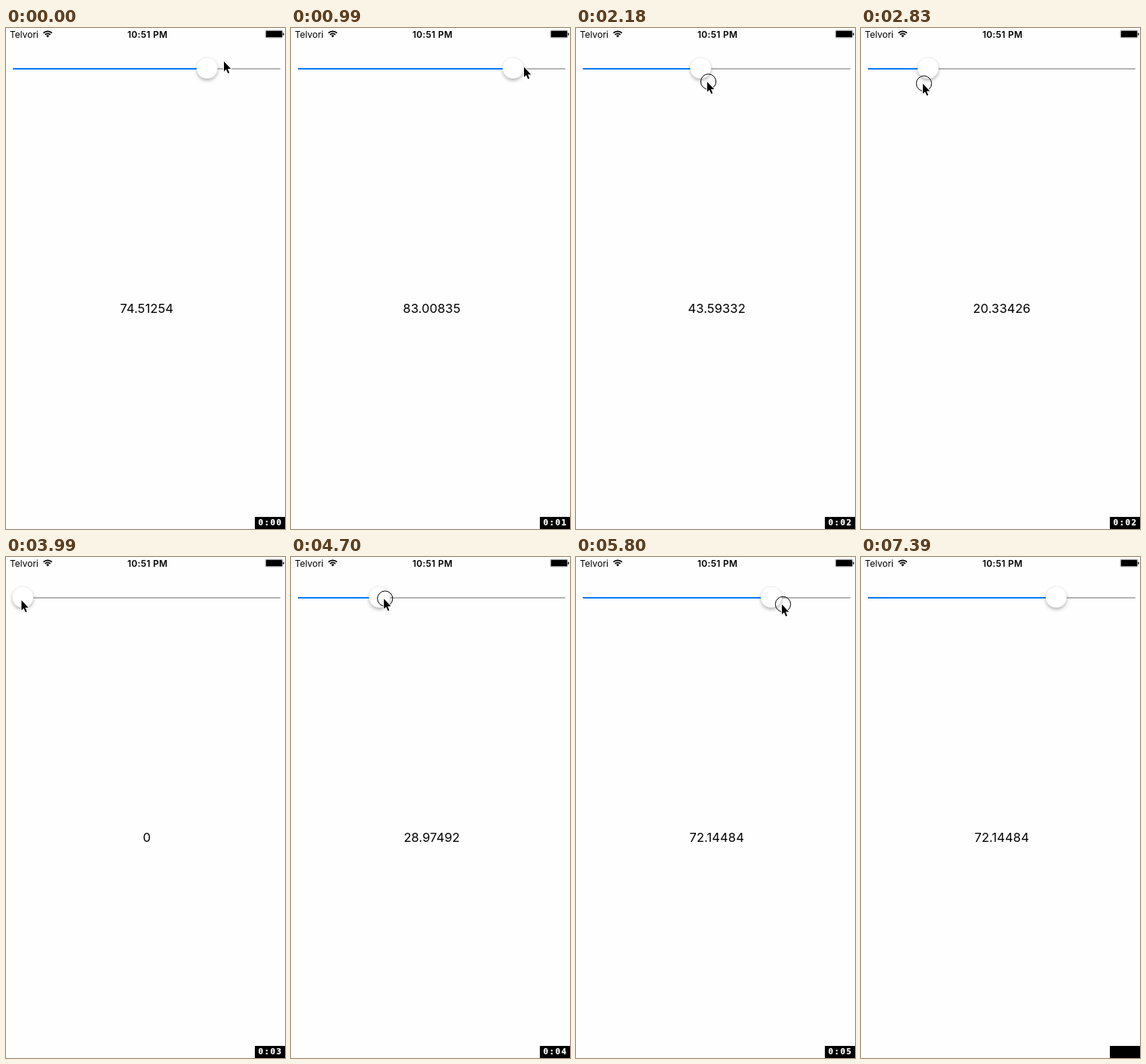
An HTML page that plays this animation: 370x663 px, repeating every 8130 ms.

```html
<!DOCTYPE html>
<html lang="en">
<head>
<meta charset="utf-8">
<title>Slider</title>
<style>
  html, body { margin: 0; width: 100%; height: 100%; overflow: hidden; background: #fefefe; }
  svg { display: block; width: 100%; height: 100%; }
  text { font-family: Inter, Roboto, sans-serif; white-space: pre; }
  #clock { font: bold 11px "DejaVu Sans Mono", monospace; letter-spacing: 1.38px; fill: #fff; stroke: #fff; stroke-width: .25px; }
</style>
</head>
<body>
<svg viewBox="0 0 370 663">
  <defs>
    <filter id="shadow" x="-50%" y="-50%" width="200%" height="200%">
      <feDropShadow dx="0" dy="2.6" stdDeviation="1.9" flood-opacity=".28"/>
    </filter>
    <path id="arrow" d="M0 .7V14L3 11.3 5.3 16.6 7.2 15.8 5 10.6H9.3Z"/>
  </defs>
  <rect width="370" height="663" fill="#fefefe"/>

  <text x="5" y="12.6" font-size="12">Telvori</text>
  <g fill="none" stroke="#000" stroke-width="1.7">
    <path d="M49.6 6.7a8.1 8.1 0 0 1 11.4 0"/>
    <path d="M51.7 8.9a5.1 5.1 0 0 1 7.2 0"/>
    <path d="M53.3 10.3a2.9 2.9 0 0 1 4 0L55.3 12.4Z" fill="#000" stroke="none"/>
  </g>
  <text x="187.7" y="12.6" font-size="12" font-weight="600" letter-spacing=".3" text-anchor="middle">10:51 PM</text>
  <rect x="344.25" y="3.25" width="22.5" height="9.5" rx="1.4" fill="none" stroke="#000" stroke-width=".5"/>
  <rect x="345" y="4" width="21" height="8" rx=".6"/>
  <path d="M367.2 6.3q1.6 .4 1.6 1.8t-1.6 1.8Z"/>

  <rect x="9" y="53" width="355" height="2" rx="1" fill="#b5b5b5"/>
  <rect id="fill" x="9" y="53" height="2" rx="1" fill="#007aff"/>
  <circle id="thumb" cy="53" r="14" fill="#fff" stroke="#000" stroke-opacity=".1" stroke-width=".6" filter="url(#shadow)"/>

  <text id="value" x="186.7" y="377.4" font-size="16.5" letter-spacing=".1" text-anchor="middle"></text>

  <g id="pointer">
    <circle id="ring" cx="1.5" cy=".5" r="10.1" fill="none" stroke="#000"/>
    <use href="#arrow" fill="#fff" stroke="#fff" stroke-width="2" stroke-linejoin="round"/>
    <use href="#arrow"/>
  </g>

  <rect x="330" y="647" width="40" height="16"/>
  <text id="clock" x="334.4" y="658.4"></text>
</svg>
<script>
const LOOP = 8130, CLOCK_OFF = 7390;
const $ = id => document.getElementById(id);
const [fill, thumb, value, pointer, ring, clock] =
  ["fill", "thumb", "value", "pointer", "ring", "clock"].map($);

const linear = p => p;
const easeIn = p => p ** 1.4;
const easeOut = p => 1 - (1 - p) ** 1.4;
const smooth = p => p * p * (3 - 2 * p);

// Each move: first and last update (ms), update count, pointer x, y, slider value, easing
const START = { x: 289, y: 43.5, v: 74.51254 };
const MOVES = [
  [60, 390, 5, 309, 51, 83.00835, smooth],
  [990, 990, 1, 309, 51, 83.00835, linear],
  [1090, 1200, 2, 305.5, 53, 83.00835, linear],
  [1440, 2180, 12, 174, 70.5, 43.59332, smooth],
  [2480, 2830, 7, 82, 73, 20.33426, easeIn],
  [2890, 3280, 7, 2, 67, 0, easeOut],
  [3340, 3520, 3, 0, 62, 0, linear],
  [3820, 3990, 4, 20.5, 56.5, 0, smooth],
  [4110, 4230, 3, 20, 58, 0, linear],
  [4410, 4870, 8, 171, 53, 42.38617, smooth],
  [5110, 5270, 3, 191, 51, 45.68245, linear],
  [5320, 5800, 8, 273, 62, 72.14484, easeOut],
  [6210, 6370, 3, 277, 60, 72.14484, linear]
];
const PRESSES = [[60, 390], [1440, 3460], [4410, 6210]];

const mix = (a, b, p) => a + (b - a) * p;

function stateAt(t) {
  let s = { ...START, last: 0 };
  for (const [t0, t1, n, x, y, v, ease] of MOVES) {
    if (t < t0) break;
    const gap = n > 1 ? (t1 - t0) / (n - 1) : 1;
    const k = Math.min(n - 1, Math.floor((t - t0) / gap + 1e-6));
    const p = ease((k + 1) / n);
    s = { x: mix(s.x, x, p), y: mix(s.y, y, p), v: mix(s.v, v, p), last: t0 + k * gap };
  }
  return s;
}

// The clock runs slightly slow and only refreshes when the picture does
const seconds = last => Math.floor((last + 15) / 1003);

function draw(t) {
  const { x, y, v, last } = stateAt(t);
  const cx = 22.3 + 3.28 * v;
  thumb.setAttribute("cx", cx);
  fill.setAttribute("width", cx - 9);
  value.textContent = String(+v.toPrecision(7));
  pointer.setAttribute("transform", `translate(${x} ${y})`);
  pointer.style.display = t < 6370 ? "" : "none";
  ring.style.display = PRESSES.some(([a, b]) => t >= a && t < b) ? "" : "none";
  clock.textContent = t < CLOCK_OFF ? "0:0" + seconds(last) : "";
}

const begin = performance.now();
function tick() {
  draw((performance.now() - begin) % LOOP);
  requestAnimationFrame(tick);
}
tick();
</script>
</body>
</html>
```
